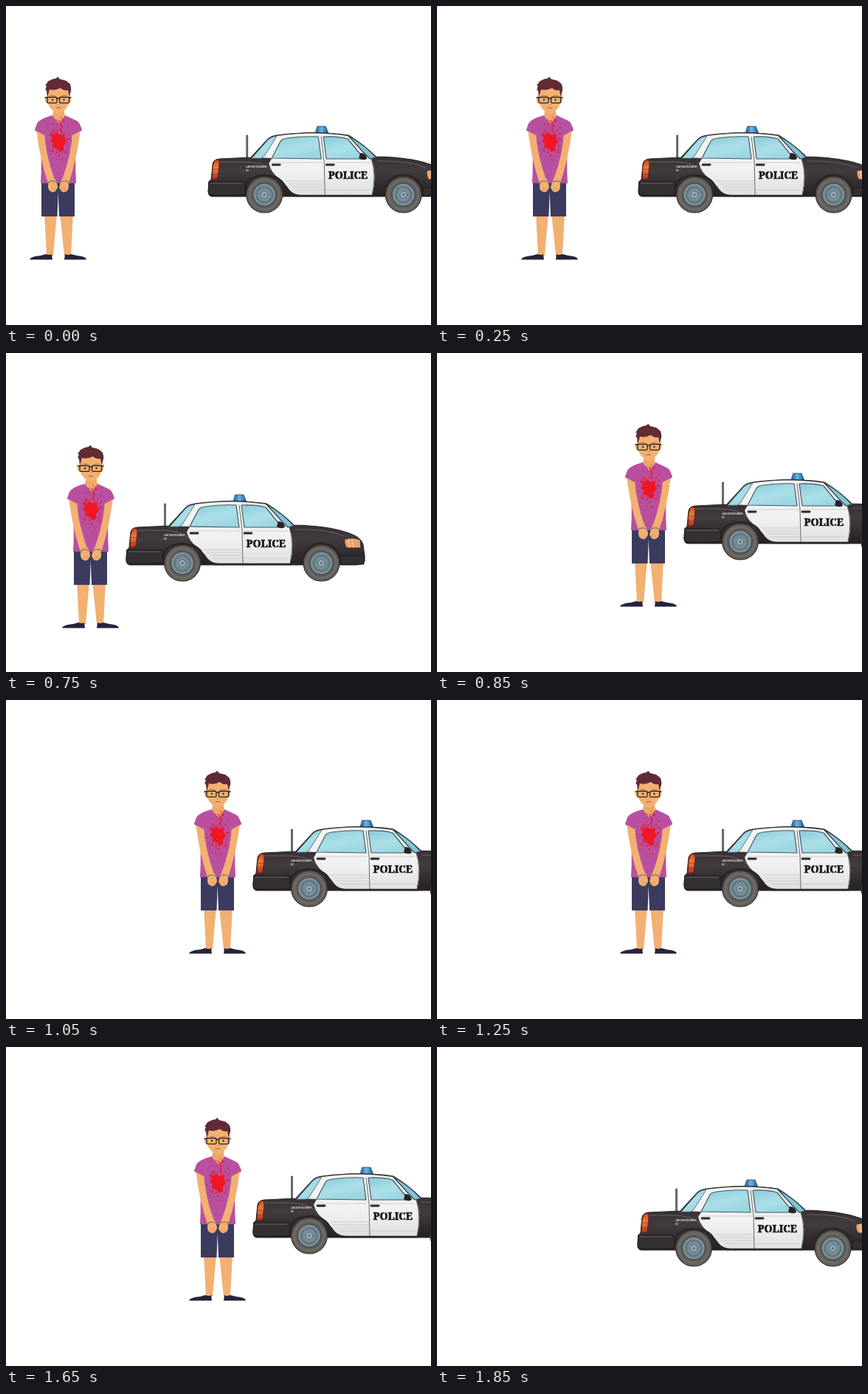
These frames come from a looping animation (576 by 432 pixels, 1.95 s). An HTML page:

```html
<!DOCTYPE html>
<html lang="en">
<head>
<meta charset="utf-8">
<style>
  html, body { margin: 0; height: 100%; overflow: hidden; background: #fff; }
  svg { display: block; width: 576px; height: 432px; }
</style>
</head>
<body>
<svg viewBox="0 0 576 432" stroke-linejoin="round" stroke-linecap="round">
  <defs>
    <linearGradient id="paint" x2="0" y2="1">
      <stop offset="0" stop-color="#524a4b"/><stop offset=".35" stop-color="#363032"/>
      <stop offset=".6" stop-color="#433b3d"/><stop offset="1" stop-color="#242021"/>
    </linearGradient>
    <linearGradient id="door" x2="0" y2="1">
      <stop offset="0" stop-color="#f5f5f5"/><stop offset=".6" stop-color="#f1f1f2"/>
      <stop offset="1" stop-color="#dfe0e2"/>
    </linearGradient>
    <linearGradient id="glass" x2=".5" y2="1">
      <stop offset="0" stop-color="#88cbd9"/><stop offset=".6" stop-color="#abdfe8"/>
      <stop offset="1" stop-color="#9bd6e1"/>
    </linearGradient>
    <linearGradient id="lamp" x2="0" y2="1">
      <stop offset="0" stop-color="#d9481f"/><stop offset=".45" stop-color="#f0803c"/>
      <stop offset="1" stop-color="#b92c1a"/>
    </linearGradient>
    <linearGradient id="beacon">
      <stop offset="0" stop-color="#174f91"/><stop offset=".45" stop-color="#69b9e6"/>
      <stop offset="1" stop-color="#174f91"/>
    </linearGradient>
    <radialGradient id="hub">
      <stop offset="0" stop-color="#a5b7c0"/><stop offset=".55" stop-color="#6f858f"/>
      <stop offset="1" stop-color="#82949b"/>
    </radialGradient>
    <g id="wheel">
      <circle r="24.4" fill="#625e5a" stroke="#35312f" stroke-width="1.2"/>
      <circle r="20" fill="none" stroke="#716d69" stroke-width="2"/>
      <circle r="15.5" fill="url(#hub)" stroke="#424a4e" stroke-width="1.3"/>
      <circle r="10.8" fill="none" stroke="#5b6f79" stroke-width="1.6"/>
      <circle r="5" fill="#92a8b3" stroke="#4d626d"/>
      <circle r="1.5" fill="#536973"/>
    </g>
  </defs>

  <g id="car">
    <path d="M323.5 206V176" stroke="#4b4c4e" stroke-width="2.8"/>
    <path d="M323.5 204V177" stroke="#909496" stroke-width=".7"/>
    <path d="M419 163H430Q432 168 434 173H416Z" fill="url(#beacon)" stroke="#153e69" stroke-width=".8"/>
    <path d="M272 238L275 235L277 214Q278 208 286 207L329 205L352 180Q356 176 364 175Q415 168 461 175Q482 188 498 204Q542 205 567 213Q589 219 592 231L594 246V253Q591 258 581 258H276Q271 257 271 251Z" fill="url(#paint)" stroke="#292526" stroke-width="1.2"/>
    <path d="M332 205L354 181Q357 178 364 176Q415 169 460 176L482 198L492 207Q500 229 493 256H396Q386 255 381 249Q375 240 365 232Q356 225 353 213L357 206Z" fill="url(#door)"/>
    <path d="M330 206L352 181Q356 177 364 176L347 203L343 206Z" fill="url(#glass)" stroke="#4c676f" stroke-width=".9"/>
    <path d="M357 206L369 183Q371 180 378 179Q400 176 420 177L424 207Z" fill="url(#glass)" stroke="#44575d" stroke-width="1.2"/>
    <path d="M427 177Q447 176 460 180L482 207H431Z" fill="url(#glass)" stroke="#44575d" stroke-width="1.2"/>
    <path d="M461 176Q483 188 498 205L490 207L481 198Z" fill="#83c3d2" stroke="#34474e" stroke-width="1.2"/>
    <path d="M357 206L353 213M424 177L428 211L429 256M492 207Q499 228 493 256" fill="none" stroke="#656568" stroke-width="1"/>
    <path d="M377 237H428M381 241H428M385 245H428M389 249H428M431 249H490M431 212H490M358 212H426" stroke="#c3c4c6" stroke-width=".8"/>
    <path d="M358 215H368M431 215H441" stroke="#29282b" stroke-width="2.8"/>
    <path d="M477 199Q485 199 486 207Q480 210 475 206Z" fill="#252326"/>
    <path d="M320 256Q318 231 346 229Q372 230 376 248Q380 257 391 257H493Q509 257 511 247Q518 227 539 229Q560 232 562 257" fill="none" stroke="#292526" stroke-width="2.6"/>
    <path d="M280 211H318Q345 211 356 222M500 210Q544 209 566 219" fill="none" stroke="#696365" stroke-width="1"/>
    <path d="M272 238H320L321 254Q318 257 276 256Q271 256 271 251ZM562 246H593V257H563Z" fill="#343031" stroke="#201d1e" stroke-width="1"/>
    <path d="M274 240H317" stroke="#6a6566" stroke-width="1.2"/>
    <path d="M280 209Q286 207 286 213L284 233Q279 236 276 234L277 217Z" fill="url(#lamp)" stroke="#52251d" stroke-width=".9"/>
    <path d="M277 221H285M277 228H284" stroke="#8d2f20" stroke-width=".8"/>
    <path d="M567 223Q579 220 588 224L589 235H570Q566 231 567 223Z" fill="#e9a26d" stroke="#372d2a"/>
    <path d="M572 224L574 234M577 224L579 234" stroke="#f8ddbd"/>
    <g fill="#e4e3e3" font-family="'Liberation Sans', sans-serif" font-weight="bold" font-size="2.8">
      <text x="322" y="219.3">LAW ENFORCEMENT</text><text x="322" y="223.7">K9</text>
    </g>
    <text x="433.6" y="234" fill="#171719" stroke="#171719" stroke-width=".7" font-family="'Noto Serif', serif" font-weight="900" font-size="14">POLICE</text>
    <path d="M448.8 222V235M474 222V235" stroke="#f2f2f3" stroke-width="1"/>
    <use href="#wheel" x="347" y="255.6"/>
    <use href="#wheel" x="535.5" y="255.6"/>
  </g>

  <g id="man">
    <path d="M52 280H69L64 338H55ZM73 280H91L88 338H79Z" fill="#f2b072"/>
    <path d="M32 343Q34 339 47 338L54 336Q60 338 62 336L63 343.5H33ZM79 343.5L80 336Q83 338 88 336L96 338Q108 339 109 343L108 343.5Z" fill="#25233d"/>
    <path d="M48 237H93V285H72L70.7 252L69.5 285H48Z" fill="#3b3b5e"/>
    <path d="M63 148Q45 153 42 159L39 168L46 174Q49 207 47 240H95Q93 205 96 174L103 168Q100 157 95 155L80 148L72 159Z" fill="#b8509f"/>
    <path d="M65 138H78L80 149L72 159L63 149Z" fill="#eba868"/>
    <path d="M55.5 111Q70 103 86.5 111L86 130Q83 140 73 146H69Q59 140 56 130Z" fill="#f3b071"/>
    <path d="M56 123Q52 121 53 128Q54 132 57 132ZM86 123Q89 121 88 128Q87 132 85 132Z" fill="#eba667"/>
    <path d="M56 124L55 114Q52 116 55 108L53 108L57 102L63 99L68 98L70 95.8L73 99L81 101L85 104L87 106L88 110Q89 114 87 118L86 124L84 114Q78 115 74 111Q66 115 59 113Z" fill="#602b34"/>
    <g fill="none" stroke="#29252b">
      <rect x="56" y="123.5" width="13" height="7.8" rx="1.6" stroke-width="1.3"/>
      <rect x="72.5" y="123.5" width="13" height="7.8" rx="1.6" stroke-width="1.3"/>
      <path d="M69 125.5Q71 124.5 73 125.5M53 124H56M86 124H88" stroke-width="1.3"/>
      <path d="M60 121L67 122M75 122L82 121" stroke="#a06a4a" stroke-width=".9"/>
      <path d="M68 138Q71 137 74 138" stroke="#9b5944" stroke-width="1"/>
      <path d="M70 133.5H72.5" stroke="#d18a55" stroke-width=".8"/>
    </g>
    <circle cx="63" cy="127" r="1.2" fill="#29252b"/><circle cx="78.5" cy="127" r="1.2" fill="#29252b"/>
    <path id="drops" fill="#f01724"/>
    <path d="M60 172L65 175L69 171L73 175L80 173L79 180L82 184L78 189L78 195L73 198L69 193L63 191L64 186L60 183L63 179Z" fill="#f01724"/>
    <path d="M41 167L52 170Q53 200 66 235L57 240Q46 208 41 167ZM101 167L90 170Q89 200 76 235L85 240Q96 208 101 167Z" fill="#f2b072"/>
    <path d="M44 157L39 168L52 175L56 160ZM98 157L103 168L90 175L86 160Z" fill="#b8509f"/>
    <path d="M58 237L66 234Q70 240 70 246L67 251Q62 254 58 249Q56 244 58 237ZM84 237L76 234Q73 240 72 246L75 251Q80 254 84 249Q86 244 84 237Z" fill="#f3b071"/>
    <path d="M62 250L63 246M66 250V246M76 250V246M80 250L79 246" stroke="#d58e55" stroke-width=".7"/>
    <path d="M57 240Q60 235 67 238M75 238Q83 235 86 240M68 239H74" fill="none" stroke="#77727b" stroke-width="1.1"/>
  </g>
</svg>
<script>
const man = document.getElementById('man'), car = document.getElementById('car');

// Seeded spray around the large stain, densest near its middle.
let seed = 17;
const rand = () => (seed = seed * 16807 % 2147483647) / 2147483647;
let drops = '';
const addDrop = (x, y, r) => {
  drops += `M${x - r} ${y}a${r} ${r} 0 1 0 ${2 * r} 0a${r} ${r} 0 1 0 ${-2 * r} 0`;
};
for (let i = 0; i < 90; i++) {
  const angle = rand() * Math.PI * 2, reach = Math.sqrt(rand());
  addDrop(72 + Math.cos(angle) * reach * 16, 182 + Math.sin(angle) * reach * 29, .5 + rand() * .6);
}
for (let i = 0; i < 9; i++) addDrop(73 + rand() * 7, 151 + i * 2.4, .6 + rand() * .7);
document.getElementById('drops').setAttribute('d', drops);

const place = (part, x, y = 0) => part.setAttribute('transform', `translate(${x} ${y})`);

function draw(now) {
  const t = now % 1950;
  let manX = 153, carX = 1, y = 0;
  if (t < 500) {
    manX = t < 250 ? 0 : 82;
    carX = t < 250 ? 3.2 : 2.1;
  } else if (t >= 1850) {
    y = 17;
  } else if (t >= 750) {
    const back = Math.floor((t - 750) / 100) % 2 === 0;
    const shift = back ? -109 : 63;
    manX += shift;
    carX += shift;
    y = back ? 29 : 0;
  }
  place(man, manX, y);
  place(car, carX, y);
  man.style.display = t >= 1850 ? 'none' : '';
}

const start = performance.now();
function tick() {
  draw(performance.now() - start);
  requestAnimationFrame(tick);
}
tick();
</script>
</body>
</html>
```
